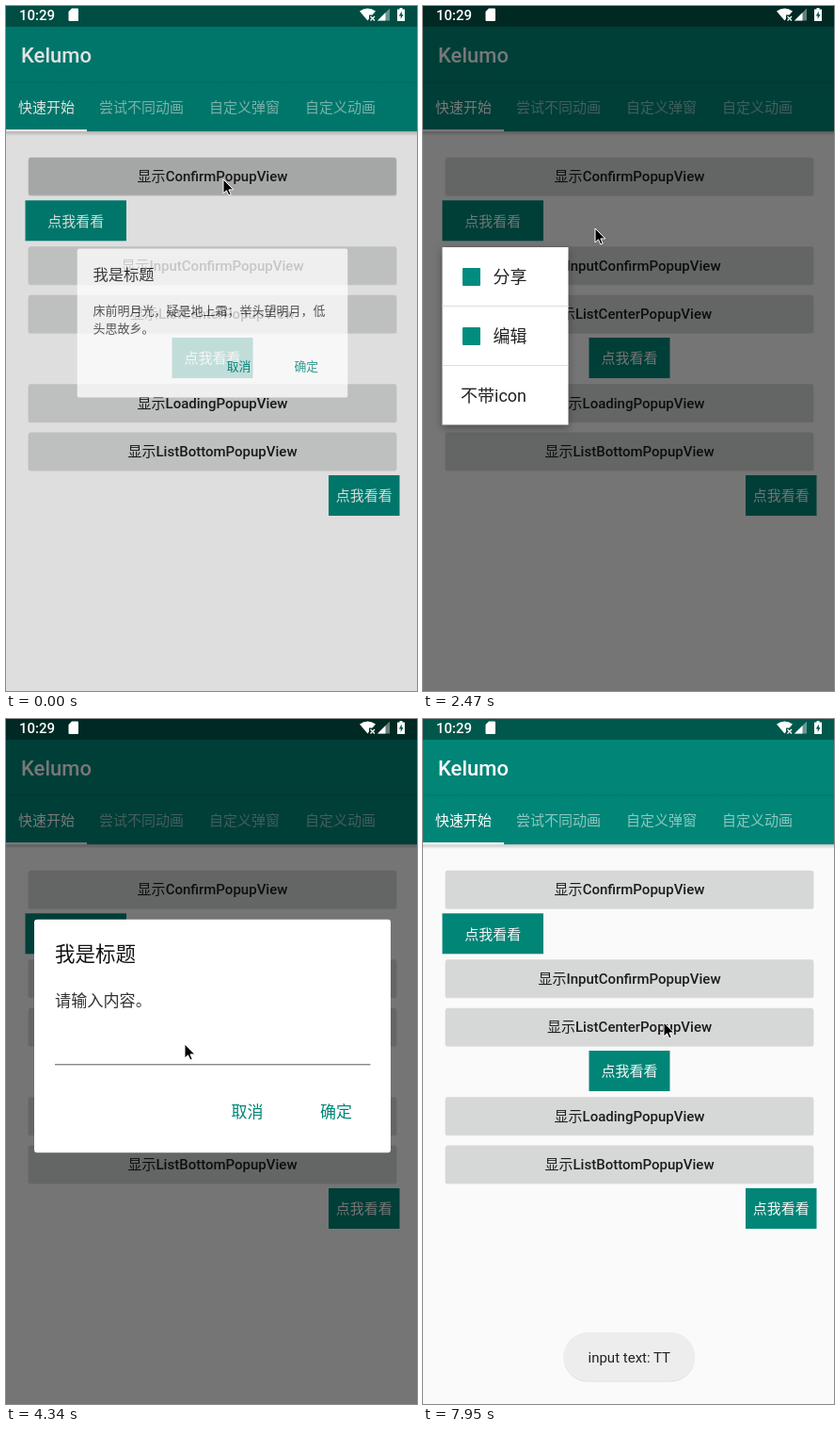
An HTML page for the animation above (8 s loop, 437 by 727 pixels).

```html
<!DOCTYPE html>
<html lang="zh-CN">
<head>
<meta charset="utf-8">
<title>Popup demo</title>
<style>
html, body { margin: 0; width: 100%; height: 100%; overflow: hidden; background: #fafafa; }
svg { display: block; width: 100vw; height: 100vh; }
text { font-family: Roboto, "Noto Sans CJK SC", "Noto Sans CJK", sans-serif; white-space: pre; }
.m { text-anchor: middle; }
.b { font-weight: 500; }
</style>
</head>
<body>
<svg id="stage" viewBox="0 0 437 727">
  <defs>
    <linearGradient id="fade" x2="0" y2="1">
      <stop stop-opacity=".22"/><stop offset="1" stop-opacity="0"/>
    </linearGradient>
  </defs>
  <g id="page"></g>
  <rect id="dim" width="437" height="727"/>
  <g id="confirm"></g>
  <g id="menu" style="filter:drop-shadow(0 3px 4px #0005)"></g>
  <g id="input"></g>
  <g id="keyboard"></g>
  <g id="toast"></g>
  <g id="status"></g>
  <path id="cursor" d="M0 0V15L3.5 11.8 5.9 17 8.2 16 5.9 10.9H10.8Z" stroke="#fff"/>
</svg>
<script>
const $ = id => document.getElementById(id);
const TEAL = '#008577', INK = '#37474f';

const text = (x, y, s, size, fill, cls = '', extra = '') =>
  `<text x="${x}" y="${y}" font-size="${size}" fill="${fill}" class="${cls}" ${extra}>${s}</text>`;
const rect = (x, y, x2, y2, fill, r = 0, extra = '') =>
  `<rect x="${x}" y="${y}" width="${x2 - x}" height="${y2 - y}" rx="${r}" fill="${fill}" ${extra}/>`;
const path = (d, fill, extra = '') => `<path d="${d}" fill="${fill}" ${extra}/>`;

// Page
const wideButton = (y, name, id) =>
  rect(23.5, y + 1, 415.5, y + 41, '#000', 2.5, 'opacity=".12"') +
  rect(24, y, 415, y + 40, '#d6d7d7', 2) +
  (id ? rect(24, y, 415, y + 40, '#000', 2, `id="${id}"`) : '') +
  text(219.5, y + 25.3, `显示<tspan class="b">${name}PopupView</tspan>`, 15, '#1c1c1c', 'm');
const tealButton = (x, y, x2) =>
  rect(x, y, x2, y + 43, TEAL) + text((x + x2) / 2, y + 27.3, '点我看看', 15, '#f4f8f7', 'm');
const tab = (x, s, on) => text(x, 113, s, 15, '#fff', '', on ? '' : 'opacity=".55"');

$('page').innerHTML =
  rect(0, 0, 437, 727, '#fafafa') +
  rect(0, 133, 437, 138, 'url(#fade)') +
  rect(0, 0, 437, 22, '#00574b') +
  rect(0, 22, 437, 133, TEAL) +
  rect(0, 80, 437, 83, 'url(#fade)', 0, 'opacity=".4"') +
  text(16, 60, 'Kelumo', 22, '#fff', 'b') +
  tab(13, '快速开始', true) + tab(99, '尝试不同动画') + tab(216, '自定义弹窗') + tab(318, '自定义动画') +
  rect(0, 131, 86, 133.3, '#fff') +
  wideButton(160.7, 'Confirm', 'press1') + tealButton(20.5, 206.3, 128) +
  wideButton(255.2, 'InputConfirm', 'press2') + wideButton(306.8, 'ListCenter') +
  tealButton(176.5, 352, 262.5) + wideButton(401.2, 'Loading') +
  wideButton(452.6, 'ListBottom') + tealButton(343, 498, 418.5);

$('status').innerHTML =
  text(14, 14.7, '10:29', 15, '#fff', 'b') +
  path('M70 2.5H76Q77 2.5 77 3.5V15Q77 16 76 16H67.5Q66.5 16 66.5 15V6Z', '#fff') +
  path('M376 5.5Q384.500 -.5 393 5.500L389.500 9.500H386V13.500L384.500 15.500Z', '#fff') +
  path('M387.500 11L392 15.500M392 11L387.500 15.500', 'none', 'stroke="#fff" stroke-width="1.300"') +
  path('M408 2.500V15.500H395Z', '#fff', 'opacity=".4"') + path('M403.500 7V15.500H395Z', '#fff') +
  path('M418.500 2H421.500V3.500H424V16H416V3.500H418.500Z', '#fff') +
  path('M420.800 5.500L417.800 10.500H419.700V14L422.500 9H420.800Z', '#00574b');

// Dialogs
const dialog = (y, y2, body) =>
  rect(30, y, 409, y2, '#fff', 3) +
  text(52, y + 44, '我是标题', 21.5, '#121212') + body +
  text(256.5, y2 - 37.3, '取消', 17, TEAL, 'm') + text(351, y2 - 37.3, '确定', 17, TEAL, 'm');

$('confirm').innerHTML = dialog(232.5, 440.5,
  text(52, 325, '床前明月光，疑是地上霜；举头望明月，低', 17.15, '#333') +
  text(52, 350, '头思故乡。', 17.15, '#333'));

$('input').innerHTML = dialog(212.7, 460.3,
  text(52, 305, '请输入内容。', 17.15, '#333') +
  text(56, 358, '', 17, '#444', '', 'id="typed"') +
  rect(52, 366, 387.5, 368, '#888', 0, 'id="line"') +
  rect(0, 340, 2, 364, TEAL, 0, 'id="caret"'));

$('menu').innerHTML =
  rect(20.5, 256, 154.5, 444.5, '#fff') +
  rect(20.5, 318, 154.5, 319, '#ddd') + rect(20.5, 381, 154.5, 382, '#ddd') +
  rect(42, 278, 61, 297, '#008c7e', 1) + rect(42, 341, 61, 360, '#008c7e', 1) +
  text(74.5, 294.3, '分享', 18, '#222') + text(74.5, 357, '编辑', 18, '#222') +
  text(40, 420, '不带icon', 18, '#222');

$('toast').innerHTML =
  rect(149.5, 652, 289, 703.5, '#000', 25.5, 'opacity=".1"') +
  rect(149.5, 651, 289, 702.5, '#ededed', 25.5) +
  text(219.3, 682.5, 'input text: TT', 15, '#222', 'm');

// Keyboard
const keys = (row, x, y) =>
  [...row].map((k, i) => text(x + 44.1 * i, y, k, 27, INK, 'm')).join('');

$('keyboard').innerHTML =
  rect(0, 412, 437, 727, '#eceff1') + rect(0, 412, 437, 456, '#e3e7e9') +
  rect(0, 455, 437, 456, '#d9dee0') +
  rect(153, 421, 154, 447, '#cbd0d3') + rect(284, 421, 285, 447, '#cbd0d3') +
  [95, 219, 343].map((x, i) => text(x, 442, '', 19, '#78848a', 'm', `id="word${i}"`)).join('') +
  rect(417.2, 424, 423.800, 438, '#67757c', 3.3) +
  path('M414 433A6.500 7 0 0 0 427 433M420.500 440V445', 'none', 'stroke="#67757c" stroke-width="2"') +
  [...'1234567890'].map((d, i) => text(35 + 44.1 * i, 474, d, 12, '#7b868b', 'm b')).join('') +
  keys('qwertyuiop', 21, 498) + keys('asdfghjkl', 43, 565) + keys('zxcvbnm', 87, 632) +
  path('M29.500 612L42.500 625H36V633H23V625H17Z', '#7a868c') + rect(20, 645, 39, 647, '#7a868c') +
  path('M396 623L403 613.500H422V632.500H403Z', '#7a868c') +
  path('M406.500 618.500L415.500 627.500M415.500 618.500L406.500 627.500', 'none', 'stroke="#eceff1" stroke-width="2"') +
  text(32, 696.5, '?123', 17, '#5f6d74', 'm') + text(87, 699, ',', 27, INK, 'm') +
  rect(113, 677, 326, 703, '#d0d5d8', 4) + text(351.5, 699, '.', 27, INK, 'm') +
  '<circle cx="406.500" cy="690" r="19.300" fill="#04b8ac"/>' +
  path('M398 690.500L404 696.500L416 684.500', 'none', 'stroke="#fff" stroke-width="2.400"') +
  '<g id="preview">' +
  rect(171.5, 388, 224, 511, '#000', 2, 'opacity=".25"') + rect(172, 386, 223.500, 509, '#ced4d6', 2) +
  text(197.500, 432, 't', 40, INK, 'm') +
  [209.500, 214.500, 219.500].map(x => rect(x - 1.2, 442, x + 1.2, 444.400, '#8fa3a8', 1.2)).join('') +
  '</g>';

// Timing
const clamp = v => Math.max(0, Math.min(1, v));

function bezier(x1, x2, y1, y2) {
  const at = (a, b, s) => 3 * a * s * (1 - s) ** 2 + 3 * b * s * s * (1 - s) + s ** 3;
  return x => {
    x = clamp(x);
    let lo = 0, hi = 1;
    for (let i = 0; i < 20; i++) {
      const mid = (lo + hi) / 2;
      if (at(x1, x2, mid) < x) lo = mid; else hi = mid;
    }
    return at(y1, y2, lo);
  };
}
const ease = bezier(.4, .2, 0, 1);
const overshoot = x => {
  const u = clamp(x) - 1;
  return u * u * (2 * u + 1) + 1;
};

// Each popup: opening and closing time, pivot
const popups = [
  { id: 'confirm', open: -97, close: 950, x: 219.5, y: 336.5, curve: overshoot },
  { id: 'menu', open: 1920, close: 2820, x: 20.5, y: 256, curve: ease },
  { id: 'input', open: 3547, close: 6860, x: 219.5, y: 336.5, curve: overshoot },
];

// Pointer stops: time, x, y
const stops = [
  [0, 231, 184], [800, 231, 184], [890, 230, 183], [1130, 230, 183], [1580, 100, 224],
  [2050, 100, 224], [2440, 183, 236], [2870, 183, 236], [3280, 200, 291], [3800, 200, 291],
  [4340, 190, 345], [4430, 190, 345], [4780, 212, 498], [5280, 212, 498], [5760, 175, 436],
  [5850, 177, 436], [5930, 188, 436], [6150, 188, 436], [6600, 355, 296], [6980, 355, 296],
  [7770, 258, 320], [7860, 258, 320], [7950, 256, 322], [8001, 256, 322],
];

function pointer(t) {
  const i = stops.findIndex(s => s[0] > t);
  const [a, ax, ay] = stops[i - 1], [b, bx, by] = stops[i];
  const k = (t - a) / (b - a), e = k * k * (3 - 2 * k);
  return [ax + (bx - ax) * e, ay + (by - ay) * e];
}

const show = (id, on) => $(id).setAttribute('visibility', on ? 'inherit' : 'hidden');
const opacity = (id, v) => $(id).setAttribute('opacity', v);
const press = (t, t0) => t < t0 ? 0 : .13 * (1 - clamp((t - t0 - 250) / 350));

function draw(t) {
  const raised = ease((t - 4400) / 300) - ease((t - 6940) / 300);
  let dark = 0;

  for (const p of popups) {
    dark += ease((t - p.open) / 410) - ease((t - p.close) / 410);
    const s = t < p.close ? p.curve((t - p.open) / 360) : 1 - ease((t - p.close) / 360);
    const lift = p.id === 'input' ? -124 * raised : 0;
    show(p.id, s > .001);
    opacity(p.id, clamp(s));
    $(p.id).setAttribute('transform',
      `translate(${p.x} ${p.y + lift}) scale(${s}) translate(${-p.x} ${-p.y})`);
  }
  opacity('dim', .53 * dark);
  opacity('press1', press(t, -97));
  opacity('press2', press(t, 3530));

  // Typing
  const typed = t < 4960 ? '' : t < 5140 ? 't' : t < 6110 ? 'tt' : 'TT';
  const composing = t < 6110;
  const words = t < 4960 || !composing ? ['', '', '']
    : t < 5230 ? ['to', 'the', 'this'] : ['tt', 'TT', 'tty'];
  const since = t - (t < 4960 ? 4440 : t < 5140 ? 4960 : composing ? 5140 : 6110);
  $('typed').textContent = typed;
  $('typed').setAttribute('text-decoration', composing ? 'underline' : 'none');
  words.forEach((w, i) => $('word' + i).textContent = w);
  $('caret').setAttribute('x', 56.5 + (composing ? 5.5 : 10.4) * typed.length);
  show('caret', t > 4400 && since % 1000 < 500);
  $('line').setAttribute('fill', t > 4400 ? TEAL : '#888');
  $('line').setAttribute('height', t > 4400 ? 2 : 1.4);
  show('preview', t >= 4960 && t < 5280);

  show('keyboard', raised > .001);
  $('keyboard').setAttribute('transform', `translate(0 ${315 * (1 - raised)})`);
  opacity('toast', ease((t - 6850) / 350));
  $('cursor').setAttribute('transform', `translate(${pointer(t)})`);
}

function frame() {
  draw(performance.now() % 8000);
  requestAnimationFrame(frame);
}
frame();
</script>
</body>
</html>
```
